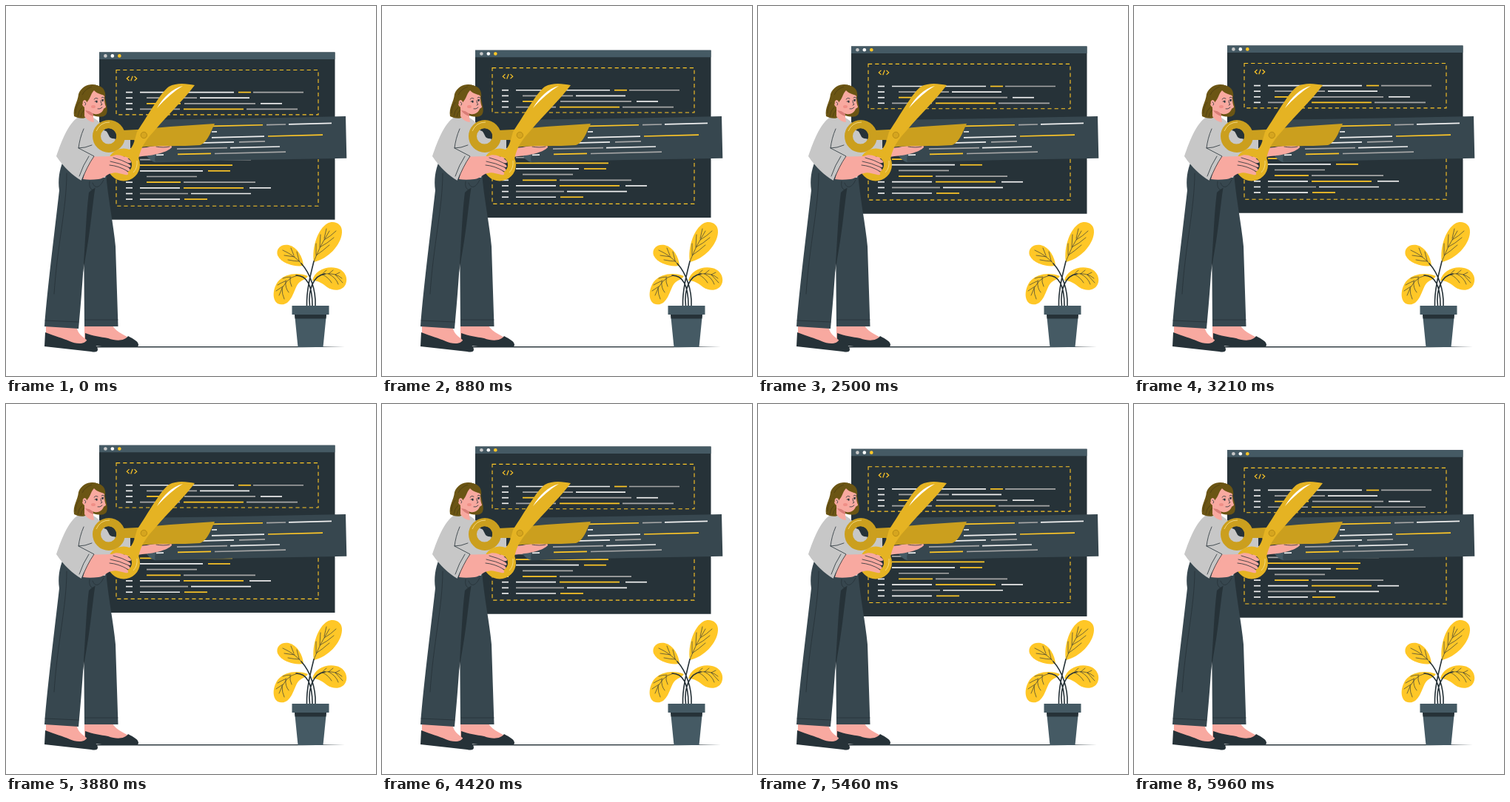
These frames come from a looping animation (500 px wide and 500 px high, 6 s). An HTML page:

```html
<!DOCTYPE html>
<html lang="en">
<head>
<meta charset="utf-8">
<title>Cutting code</title>
<style>
html, body { margin: 0; width: 100%; height: 100%; overflow: hidden; background: #fff; }
svg { display: block; width: 100vw; height: 100vh; }
.ink { fill: none; stroke: #263238; stroke-width: .8; stroke-linecap: round; stroke-linejoin: round; }
.stem { stroke-width: 1.6; }
.vein { stroke-width: .65; }
.skin { fill: #f8a9a0; }
.hair { fill: #6b5514; }
.dark { fill: #263238; }
.cloth { fill: #37474f; }
.slate { fill: #455a64; }
.shirt { fill: #c7c7c7; }
.leaf { fill: #ffc727; }
.lit { fill: #e5b323; }
.shade { fill: #cb9f1e; }
.dash { fill: none; stroke: #ffc727; stroke-width: 1.1; stroke-dasharray: 5.2 4; }
</style>
</head>
<body>
<svg viewBox="0 0 500 500">
  <path class="dark" d="M120 460 L400 460 L458 460.5 L400 461.2 L120 461.4Z"/>

  <g id="board">
    <path class="dark" d="M126 62.5H444.5V288.8H126Z"/>
    <path class="slate" d="M126 62.5H444.5V72H126Z"/>
    <circle cx="134.4" cy="67.4" r="2.3" fill="#c7c7c7"/>
    <circle cx="143.8" cy="67.4" r="2.3" fill="#fff"/>
    <circle cx="153.3" cy="67.4" r="2.3" fill="#ffc727"/>
    <path class="dash" d="M149 86.5H422V146.9H149Z"/>
    <path class="dash" d="M149 207V270.2H422V207"/>
    <path d="M166.5 95 L163.3 98 L166.5 101 M173.5 95 L176.7 98 L173.5 101 M171.2 94.8 L168.7 101.3" fill="none" stroke="#ffc727" stroke-width="1.2"/>
    <g id="code"></g>
  </g>

  <g id="strip">
    <path class="cloth" d="M205 153.5 Q330 152 459 149 L460.3 205.8 Q330 207.5 202 211.3 L189 200Z"/>
    <path class="slate" d="M187 198 L203 200 Q200 206 202 211.3 Q193 209 187 198Z"/>
    <g id="cut"></g>
  </g>

  <g id="plant">
    <path class="leaf" d="M416 346 C413 325 422 301 434 294 C443 289 455 294 454 306 C453 323 435 342 416 346Z"/>
    <path class="leaf" d="M402 351 C390 353 372 348 367 337 C364 328 372 321 382 323 C394 326 401 339 402 351Z"/>
    <path class="leaf" d="M408 365 C397 360 377 360 367 373 C359 385 360 401 370 403 C384 406 388 388 393 378 C397 370 404 371 408 365Z"/>
    <path class="leaf" d="M414 371 C417 358 432 351 446 354 C457 356 463 367 459 376 C455 385 443 386 434 380 C428 375 422 371 414 371Z"/>
    <path class="ink stem" d="M406.5 405 C406 385 411 365 416 345 M418 405 C419 384 411 361 399 348 M414 405 C414 378 407 364 392 364 M410.5 405 C408 384 415 364 431 362"/>
    <path class="ink vein" d="M416 345 Q424 324 437 304 M419 336 L419 321 M424 325 L425 309 M430 314 L433 301 M419 337 Q428 331 437 323 M424 326 Q434 321 443 313 M430 316 Q439 311 446 304"/>
    <path class="ink vein" d="M400 349 Q390 337 374 330 M396 344 L393 332 M389 337 L385 327 M397 345 Q390 345 381 343 M390 339 L376 337"/>
    <path class="ink vein" d="M394 364 Q377 367 369 391 M385 366 Q379 366 374 368 M379 371 Q372 374 367 377 M374 379 L365 385 M384 367 Q383 373 386 379 M378 372 Q377 381 382 387 M373 381 Q373 390 376 396"/>
    <path class="ink vein" d="M430 362 Q445 360 454 368 M427 363 Q429 360 433 357 M436 362 L442 357 M445 363 L451 360 M428 363 Q436 367 440 374 M436 362 Q446 367 449 376 M445 363 L455 374"/>
    <path class="slate" d="M390 416H433L428.5 461H394.5Z"/>
    <path class="dark" d="M390 416H433L432.4 422.5H390.6Z"/>
    <path class="slate" d="M386.5 405H436.5V417H386.5Z"/>
  </g>

  <g id="legs">
    <path class="skin" d="M106 430H143C147 439 157 443 167 449L163 454H106Z"/>
    <path class="dark" d="M107 442C117 446 128 447 138 449C149 453 160 453 165 446C172 450 179 453 179 458C179 461 175 461 170 461H141L107 458Z"/>
    <path class="skin" d="M54 431H95C96 443 103 446 111 453L108 460H54Z"/>
    <path class="dark" d="M53 441C66 446 77 449 86 453C95 457 107 458 110 450C116 454 124 459 124 464C124 468 120 468 115 467L52 460Z"/>
    <path class="cloth" d="M100 222L135 226C138 261 145 294 148 325L151.5 433H106L105 300Z"/>
    <path class="dark" d="M108 244L121 243C117 265 115 300 106 348L104 360Z"/>
    <path class="cloth" d="M77 210L136 224L135 237C128 243 117 246 112 252C107 290 107 344 98 436L52 433C56 381 65 311 72 249C70 235 72 222 77 210Z"/>
    <path class="ink" d="M82 226C82 273 69 325 65 389M53 425L98 427M107 424L151 424M117 239C120 247 126 247 132 235M113 237Q111 247 118 249"/>
  </g>

  <g id="body">
    <path class="skin" d="M161 191C182 195 198 188 213 188C219 187 225 188 224 191C218 198 199 202 184 203L160 207Z"/>
    <path class="ink" d="M203 190Q213 192 221 190"/>
    <path class="shirt" d="M103 148C92 151 88 160 84 170L77 210C93 221 110 233 134 232L140 212C150 204 160 200 168 197V180C157 177 145 182 140 177C134 164 126 155 118 151Z"/>
  </g>

  <g id="head">
    <path class="hair" d="M92 149C90 137 97 130 98 119C102 107 116 103 125 108C133 110 135 117 134 124C135 133 139 141 135 147C131 151 124 150 118 148L107 151C102 153 96 151 92 149Z"/>
    <path class="skin" d="M106 134L106 149C109 154 115 157 119 157L117 143Z"/>
    <path d="M107 141Q111 147 118 149L117 143Z" fill="#d97d77"/>
    <path class="skin" d="M110 130C110 122 113 116 118 113C123 117 130 117 133 122C133 128 133 131 135 136C135 138 132 138 132 139C130 145 123 148 117 145C112 142 107 138 104 135C101 130 105 126 109 129Z"/>
    <path class="hair" d="M109 130C114 126 114 119 119 114C122 118 128 119 133 121C134 111 125 105 114 107C102 111 104 122 102 133Z"/>
    <path class="skin" d="M109 136C103 136 102 128 106 127C109 127 110 131 109 136Z"/>
    <path d="M97 149Q98 141 103 137M101 150Q102 144 106 140M94 145Q94 136 99 130M103 120Q107 112 116 109" fill="none" stroke="#493b12" stroke-width=".7"/>
    <ellipse cx="118" cy="136" rx="3" ry="2" fill="#ef8f87"/>
    <ellipse class="dark" cx="122.5" cy="129.3" rx="1.1" ry="1.5"/>
    <ellipse class="dark" cx="130.7" cy="127.6" rx="1.1" ry="1.5"/>
    <path class="ink" d="M119 126Q121 123 124 125M129 124Q131 122 133 124M128 128Q128 132 130 133L128 134M124 139Q127 140 130 137M120 129L123 128M129 127L132 126M106 130Q109 131 107 134"/>
  </g>

  <g id="scissors">
    <path class="shade" d="M158 168L177 167L222 163L282 159C277 169 273 184 262 188C237 190 205 188 180 191L173 181L158 181Z"/>
    <path class="shade" fill-rule="evenodd" d="M117 176A22 22 0 1 1 161 176A22 22 0 1 1 117 176ZM128 176A10.5 10.5 0 1 0 149 176A10.5 10.5 0 1 0 128 176Z"/>
    <path class="dark" d="M132 167.7A10.5 10.5 0 0 1 148 180.5Q142 171 132 167.7Z"/>
    <path class="lit" d="M163 197C172 192 173 184 177 170C193 146 209 117 220 109C231 103 244 105 255 107C240 127 218 148 201 168C190 180 182 190 179 207Z"/>
    <path class="lit" fill-rule="evenodd" d="M137 214.5A22 22 0 1 1 181 214.5A22 22 0 1 1 137 214.5ZM148 214.5A11 11 0 1 0 170 214.5A11 11 0 1 0 148 214.5Z"/>
    <path d="M204 138C213 123 224 112 239 108C227 115 216 125 204 138Z" fill="#fff"/>
    <path d="M122 169Q127 157 140 157M172 225Q178 219 177 209" fill="none" stroke="#f7dc83" stroke-width=".9"/>
    <circle cx="186.3" cy="174.5" r="4.2" fill="#d5a51f" stroke="#a98012" stroke-width=".7"/>
  </g>

  <g id="arm">
    <path class="skin" d="M112 203C124 204 134 203 143 203C151 199 160 203 167 208C171 211 169 213 164 212C170 216 170 218 165 218C169 221 168 224 163 223C167 227 165 229 161 228C153 226 148 224 143 226C136 227 133 233 125 234C117 235 110 235 104 234Z"/>
    <path class="ink" d="M145 205Q157 208 166 213M141 210Q153 212 166 218M140 215Q152 216 164 223"/>
    <path class="shirt" d="M94 153C81 164 73 189 68 203C78 218 90 229 102 236C106 224 112 213 119 203L99 192L108 164Z"/>
    <path class="ink" d="M105 166C101 175 99 184 98 192L119 203C112 213 107 224 102 236M98 192Q107 192 116 188M99 230Q104 215 112 203"/>
  </g>
</svg>
<script>
const colors = { w: '#f0f0f0', g: '#a6a6a6', y: '#ffc727' };

// Each row is "y: colour x1 x2, ..."; slope tilts it.
function drawRows(id, rows, slope = 0) {
  document.getElementById(id).innerHTML = rows.map(row => {
    const [y, parts] = row.split(':');
    return parts.split(',').map(part => {
      const [color, x1, x2] = part.trim().split(' ');
      const dy = (x2 - x1) * slope;
      return `<path d="M${x1} ${y}L${x2} ${+y + dy}" stroke="${colors[color]}" stroke-width="1.7"/>`;
    }).join('');
  }).join('');
}

drawRows('code', [
  '116.6: w 162 171, w 181 308, y 314 331, g 334 402',
  '124.2: w 162 171, g 190 258, w 262 329',
  '131.8: w 162 171, y 190 236, g 241 337, w 344 373',
  '139.4: w 162 171, g 181 235, y 240 321, g 325 394',
  '207.6: g 181 236, g 240 331',
  '215.2: y 181 306',
  '222.8: w 181 266, y 273 303',
  '230.5: g 190 258',
  '238.2: w 162 171, y 190 236, g 240 337',
  '245.8: w 162 171, w 181 235, y 240 321, w 329 358',
  '253.5: w 162 171, g 181 246, w 250 331',
  '261.1: w 162 171, w 181 235, y 241 272'
]);
drawRows('cut', [
  '162.4: y 278 347', '160.6: g 352 378', '159.8: w 382 440',
  '170: w 278 285',
  '177.8: w 278 349', '176: y 354 428',
  '185.8: w 231 308', '183.8: g 315 350',
  '193.2: g 231 299', '191.6: w 303 370',
  '201.3: w 203 213', '200.4: y 232 277', '199.5: g 282 378'
], -0.024);

const board = document.getElementById('board');
const LOOP = 6000, LIFT = 9.7;
function frame() {
  const phase = performance.now() % LOOP / LOOP;
  const lift = LIFT * (1 - Math.abs(1 - 2 * phase));
  board.setAttribute('transform', `translate(0 ${-lift})`);
  requestAnimationFrame(frame);
}
frame();
</script>
</body>
</html>
```
